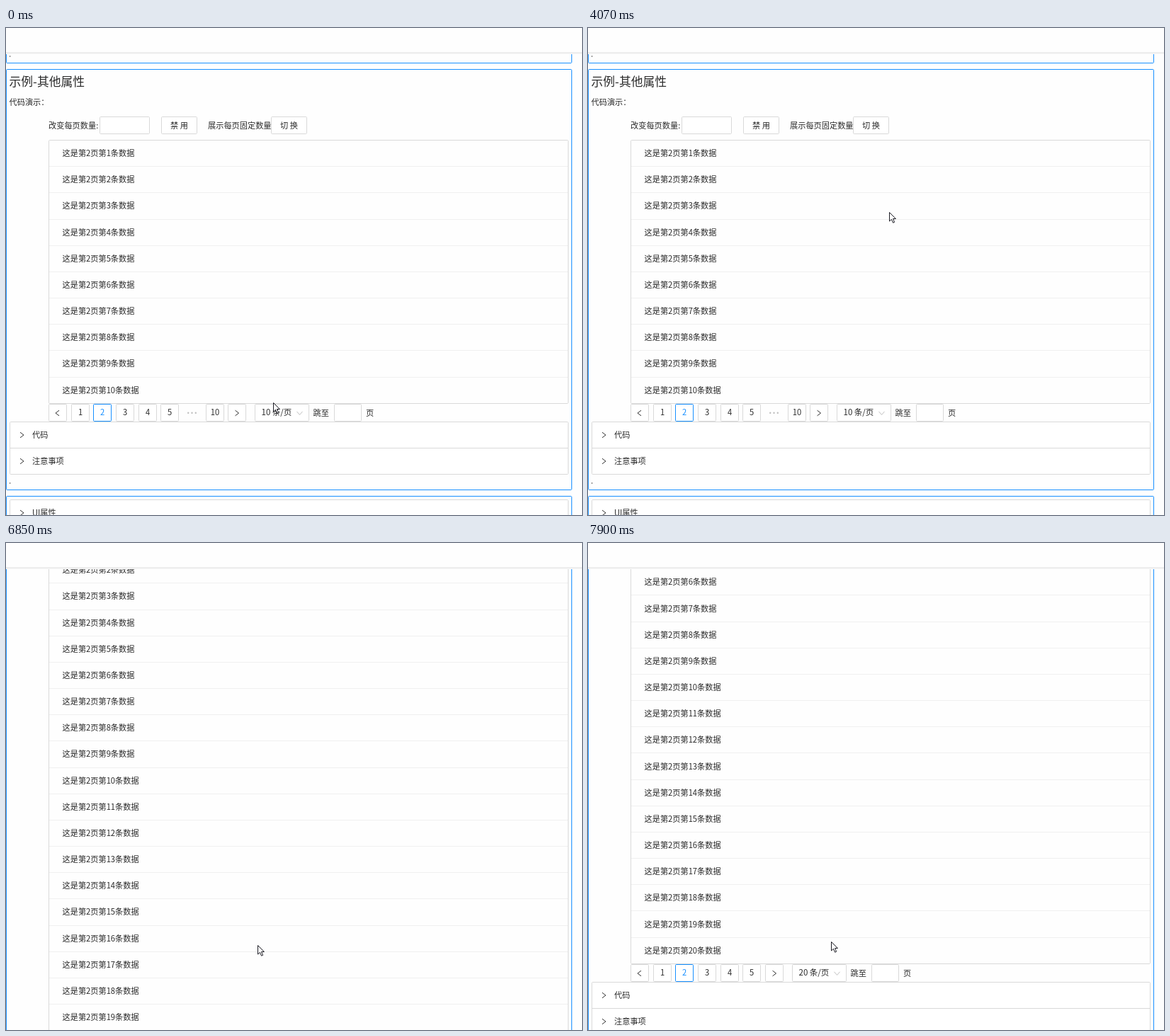
An HTML page that plays this animation: 813x688 px, repeating every 8 s.

```html
<!DOCTYPE html>
<html lang="zh">
<head>
<meta charset="utf-8">
<title>分页示例</title>
<style>
  html, body { margin: 0; width: 100%; height: 100%; overflow: hidden; background: #fefefe; }
  svg { display: block; width: 100vw; height: 100vh; }
  text { font: 11.2px "Noto Sans CJK SC", "Noto Sans CJK", "Noto Sans", sans-serif; fill: #2a2a2a; white-space: pre; }
</style>
</head>
<body>
<svg id="stage" viewBox="0 0 813 688" xmlns="http://www.w3.org/2000/svg"></svg>
<script>
const LOOP = 8000;
const BLUE = '#1890ff', GREY = '#d9d9d9', FAINT = '#f0f0f0', MUTED = '#bfbfbf', INK = '#2a2a2a';
const ROW = 37.17, LIST_TOP = 158.5, EXTRA = ROW * 10, PITCH = 31.68;

// Stepped tracks: [time, value...]
const POINTER = [
  [0, 377, 529, 'arrow'], [150, 388, 537, 'hand'], [270, 394, 537, 'hand'],
  [420, 398, 537, 'hand'], [540, 412, 538, 'hand'], [660, 434, 542, 'arrow'],
  [810, 416, 562, 'hand'], [960, 394, 544, 'hand'],
  [2210, 390, 537, 'hand'], [2330, 378, 508, 'arrow'], [2460, 352, 450, 'arrow'], [2580, 331, 401, 'arrow'],
  [2720, 315, 320, 'arrow'], [2840, 323, 238, 'arrow'], [2960, 333, 184, 'arrow'],
  [3100, 343, 165, 'arrow'], [3230, 353, 145, 'arrow'],
  [3370, 376, 141, 'hand'], [3500, 388, 141, 'hand'], [3650, 391, 140, 'hand'],
  [4070, 425, 260, 'arrow'], [4190, 452, 410, 'arrow'], [4320, 461, 520, 'arrow'], [4440, 411, 537, 'hand'],
  [4590, 406, 538, 'hand'], [4830, 405, 546, 'hand'], [4950, 403, 557, 'hand'], [5070, 402, 565, 'hand'],
  [5210, 399, 606, 'hand'], [5340, 396, 638, 'hand'], [5490, 397, 640, 'hand'], [5620, 396, 638, 'hand'],
  [5770, 389, 612, 'hand'], [5900, 379, 586, 'hand'], [6050, 377, 577, 'hand'],
  [6730, 368, 573, 'arrow'], [6850, 355, 568, 'arrow'], [6970, 343, 563, 'arrow']
];
const SCROLL = [[0, 0], [6730, 62], [6850, 176], [6970, 276], [7090, 316.4], [7340, 326], [7490, 337], [7770, 331], [7900, 307.6]];
const MENU = [[0, 0], [420, .35], [540, .9], [660, 1], [2210, .6], [2330, .15], [2460, 0],
  [4590, .35], [4710, .9], [4830, 1], [6480, 0]];
const SELECT = [[0, 'idle'], [150, 'hover'], [420, 'open'], [2210, 'focus'], [3920, 'idle'],
  [4440, 'hover'], [4590, 'open'], [6480, 'idle']];

const at = (track, t) => track.reduce((last, key) => key[0] <= t ? key : last);
const within = (t, a, b) => t >= a && t < b;

const text = (x, cy, str, attrs = '') => `<text x="${x}" y="${cy + 4}" ${attrs}>${str}</text>`;
const middle = (x, cy, str, fill = INK) => text(x, cy, str, `text-anchor="middle" style="fill:${fill}"`);
const box = (x, y, w, h, stroke = GREY, fill = '#fff') =>
  `<rect x="${x + .5}" y="${y + .5}" width="${w}" height="${h}" rx="1.2" fill="${fill}" stroke="${stroke}"/>`;
const fillRect = (x, y, w, h, fill) => `<rect x="${x}" y="${y}" width="${w}" height="${h}" fill="${fill}"/>`;
const line = (d, stroke = '#333', width = 1) => `<path d="${d}" fill="none" stroke="${stroke}" stroke-width="${width}"/>`;
const right = (x, y) => line(`M${x - 2.5} ${y - 3.8}l5 3.8l-5 3.8`);
const left = (x, y) => line(`M${x + 2.5} ${y - 3.8}l-5 3.8l5 3.8`);
const down = (x, y) => line(`M${x - 4} ${y - 2.2}l4 4.6l4 -4.6`, MUTED);
const shift = (y, inner) => `<g transform="translate(0 ${Math.round(y)})">${inner}</g>`;

function button(x, w, label, active) {
  const color = active ? BLUE : null;
  return box(x, 125, w, 24, color || GREY) + middle(x + w / 2 + .5, 138, label, color || INK);
}

// Rows snap to whole pixels after scrolling.
function list(count, scroll) {
  const top = LIST_TOP - scroll, y0 = Math.floor(top);
  let out = box(60, y0, 733, Math.floor(top + ROW * count) - y0, GREY, 'none');
  for (let i = 0; i < count; i++) {
    out += text(79.5, Math.round(top + ROW * (i + .5)), `这是第2页第${i + 1}条数据`);
    if (i) out += fillRect(61, Math.floor(top + ROW * i), 732, 1, FAINT);
  }
  return out;
}

function pager(items, size, mode) {
  let out = '';
  items.forEach((item, i) => {
    const x = Math.round(60 + PITCH * i), cx = x + 13, active = item === '2';
    if (item === '…') {
      for (let k = -1; k <= 1; k++) out += `<circle cx="${cx - .5 + k * 5.3}" cy="543.7" r="1.2" fill="${MUTED}"/>`;
      return;
    }
    out += box(x, 531, 25, 24, active ? BLUE : GREY);
    if (item === '<') out += left(cx - .5, 544);
    else if (item === '>') out += right(cx, 544);
    else out += middle(cx, 543, item, active ? BLUE : INK);
  });
  const x = Math.round(60 + PITCH * items.length) + 6;
  const lit = mode !== 'idle';
  if (mode === 'open' || mode === 'focus')
    out += `<rect x="${x - 2}" y="529" width="81" height="29" rx="3" fill="${BLUE}" opacity=".2"/>`;
  out += box(x, 531, 76, 24, lit ? BLUE : GREY);
  out += text(x + 9.5, 543, `${size} 条/页`, `style="font-size:11.5px;fill:${mode === 'open' ? MUTED : INK}"`);
  out += down(x + 63.5, 544);
  out += text(x + 82.5, 544, '跳至') + box(x + 112, 531, 38, 24) + text(x + 157, 544, '页');
  return out;
}

function panel(y, labels) {
  let out = box(5, y, 788, 37 * labels.length, GREY);
  labels.forEach((label, i) => {
    const cy = y + 19 + 37 * i;
    if (i) out += fillRect(5, y + 37 * i, 789, 1, GREY);
    out += right(22.5, cy) + text(37, cy, label);
  });
  return out;
}

function menu(sizes, alpha) {
  const h = sizes.length * 25.3 + 6.4;
  let out = `<rect x="337" y="554.5" width="106" height="${h + 27}" rx="16" fill="#000" opacity=".035"/>
    <rect x="348" y="562" width="83" height="${h + 2}" rx="4" fill="#000" opacity=".14" filter="url(#soft)"/>
    <rect x="351" y="559.2" width="77" height="${h}" rx="1.6" fill="#fff"/>`;
  sizes.forEach((size, i) => {
    const y = 562.4 + 25.3 * i, chosen = size === 10;
    if (chosen) out += fillRect(351, y, 77, 25.3, '#e6f7ff');
    out += text(360.5, Math.round(y + 12.4), `${size} 条/页`,
      `style="font-size:11.5px;${chosen ? 'font-weight:700;fill:#111' : ''}"`);
  });
  const scale = .8 + .2 * alpha;
  return `<g opacity="${alpha}" transform="translate(0 ${559 * (1 - scale)}) scale(1 ${scale})">${out}</g>`;
}

function pointer(x, y, kind) {
  const d = kind === 'arrow'
    ? 'M.5 .5V13L3.4 10.3L5.6 15.2L7.6 14.3L5.5 9.5H9.4Z'
    : 'M4.6 11.4V2.1a1.25 1.25 0 0 1 2.5 0V7.2a1.2 1.2 0 0 1 2.3 .3a1.2 1.2 0 0 1 2.2 .5a1.1 1.1 0 0 1 2.1 .7V13.2L12.2 18.4H5.9L4.7 15.8L1 11.3a1.2 1.2 0 0 1 1.8 -1.5Z';
  const joints = kind === 'hand' ? '<path d="M7.1 7.2V9.8M9.4 7.6V10M11.6 8.2V10.4" fill="none"/>' : '';
  return `<g transform="translate(${x} ${y})" stroke="#1c1c24" stroke-width="1" stroke-linejoin="round"><path d="${d}" fill="#fff"/>${joints}</g>`;
}

function scene(t) {
  const long = t >= 6480, grow = long ? EXTRA : 0;
  const scroll = at(SCROLL, t)[1], alpha = at(MENU, t)[1];
  const pages = long ? '< 1 2 3 4 5 >' : '< 1 2 3 4 5 … 10 >';
  const tick = y => fillRect(5, y, 1.2, 2, '#777');

  const head = box(0, -60, 798, 109, BLUE, 'none') + tick(39)
    + box(0, 58, 798, 594 + Math.round(grow), BLUE, 'none')
    + text(4.5, 78, '示例-其他属性', 'style="font-size:16.8px"')
    + text(4.5, 105, '代码演示：')
    + text(60, 138, '改变每页数量:') + box(132, 125, 70, 24)
    + button(219, 50, '禁 用') + text(285, 138, '展示每页固定数量')
    + button(374, 50, '切 换', within(t, 3370, 4070));

  const tail = pager(pages.split(' '), long ? 20 : 10, at(SELECT, t)[1])
    + panel(556, ['代码', '注意事项']) + tick(642)
    + box(0, 661, 798, 200, BLUE, 'none') + panel(666, ['UI属性', '']);

  let top = '';
  if (alpha) top += menu(t < 4000 ? [10, 20, 50, 100, 200] : [20, 30, 40, 10], alpha);
  top += fillRect(0, 0, 813, 34, '#fefefe') + fillRect(0, 34, 813, 2, '#ededed') + fillRect(0, 36, 813, 1, '#f7f7f7');
  const [, x, y, kind] = at(POINTER, t);
  if (within(t, 1520, 2210))
    top += box(406, 556, 49, 19, '#4a4a4a') + text(412.5, 565.5, '10 条/页', 'style="font-size:10px;fill:#505050"');
  top += pointer(x, y, kind);

  return `<defs><filter id="soft" x="-30%" y="-30%" width="160%" height="160%"><feGaussianBlur stdDeviation="3"/></filter></defs>`
    + shift(-scroll, head) + list(long ? 20 : 10, scroll) + shift(grow - scroll, tail) + top;
}

const stage = document.getElementById('stage');
let shown = '';
function frame(now) {
  const next = scene(now % LOOP);
  if (next !== shown) stage.innerHTML = shown = next;
  requestAnimationFrame(frame);
}
frame(performance.now());
</script>
</body>
</html>
```
